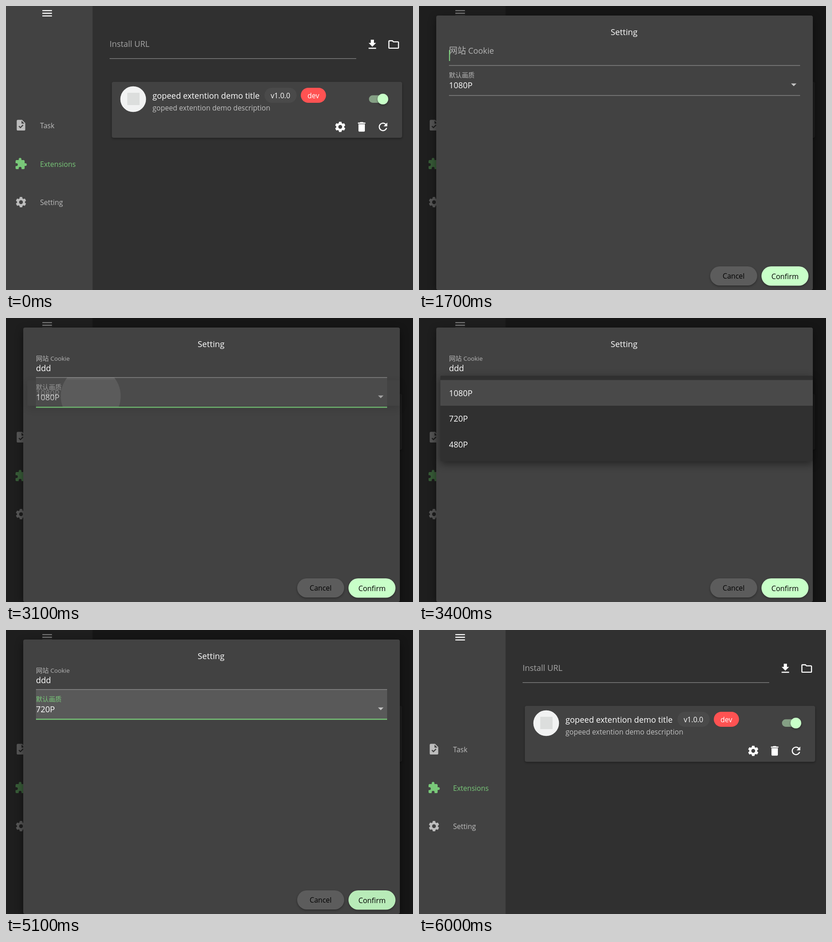
Animation of 896x625 px, one loop 7100 ms. Source, as an HTML page:

```html
<!DOCTYPE html>
<html lang="en">
<head>
<meta charset="utf-8">
<title>Extension settings</title>
<style>
  html, body { margin: 0; height: 100%; overflow: hidden; background: #303030; }
  svg { display: block; width: 100vw; height: 100vh; }
  text { font: 17.9px "Open Sans", "Noto Sans CJK SC", "Noto Sans CJK", sans-serif; fill: #fff; }
  .small { font-size: 15.6px; }
  .medium { font-size: 15.6px; font-weight: 500; }
  .cjk { font-size: 18.8px; }
  .muted { fill: #b5b5b5; }
  .line { fill: #868686; }
  .green { fill: #79c879; }
  .icon { fill: #fff; }
  .icon.muted { fill: #bdbdbd; }
  .icon.green { fill: #79c879; }
  .raised { filter: drop-shadow(0 2px 2px rgba(0, 0, 0, .35)); }
  .dialog { filter: drop-shadow(0 6px 9px rgba(0, 0, 0, .45)); }
</style>
</head>
<body>
<svg viewBox="0 0 896 625">
  <defs>
    <clipPath id="cardClip"><rect x="233" y="167" width="639" height="123" rx="4"/></clipPath>
    <clipPath id="fieldClip"><rect x="66" y="131" width="773" height="66"/></clipPath>
    <clipPath id="rowClip"><rect x="47" y="193" width="820" height="56"/></clipPath>
    <clipPath id="menuClip"><rect class="menuBox" x="47" width="820" rx="2"/></clipPath>
  </defs>

  <rect width="896" height="625" fill="#303030"/>
  <rect width="190.5" height="625" fill="#424242"/>
  <g id="icons"></g>
  <text class="medium" x="75" y="269" style="fill:#bdbdbd">Task</text>
  <text class="medium green" x="75" y="353.5">Extensions</text>
  <text class="medium" x="75" y="438" style="fill:#bdbdbd">Setting</text>

  <text x="228" y="90" style="fill:#a5a5a5">Install URL</text>
  <rect class="line" x="228" y="115" width="543" height="1.3"/>

  <rect class="raised" x="233" y="167" width="639" height="123" rx="4" fill="#424242"/>
  <circle cx="280" cy="205" r="28.3" fill="#f1f2f2"/>
  <rect x="267" y="191" width="27" height="27" fill="#dcdedd"/>
  <text x="322.5" y="204">gopeed extention demo title</text>
  <text class="small" x="322.5" y="230" style="fill:#c0c0c0">gopeed extention demo description</text>
  <rect x="569" y="180" width="71" height="33" rx="16.5" fill="#4a4a4a"/>
  <text class="medium" x="604.2" y="203" text-anchor="middle">v1.0.0</text>
  <rect x="649" y="180" width="55.5" height="33" rx="16.5" fill="#ff5252"/>
  <text class="medium" x="676.7" y="203" text-anchor="middle">dev</text>
  <rect x="799" y="196.5" width="39" height="16.5" rx="8.2" fill="#85a085"/>
  <circle class="raised" cx="829.7" cy="204.8" r="11.8" fill="#c8ffc8"/>
  <g clip-path="url(#cardClip)">
    <circle id="gearRipple" cx="735.5" cy="265.5" fill="#fff" opacity=".2"/>
  </g>
  <g id="cardIcons"></g>

  <rect id="barrier" width="896" height="625"/>
  <g id="dialog">
    <rect class="dialog" x="38" y="21" width="829" height="604" rx="4" fill="#424242"/>
    <text x="451.5" y="64" text-anchor="middle" style="font-size:18.2px">Setting</text>

    <rect id="cookieLine" x="66" width="773"/>
    <text id="cookieLabel"><tspan class="cjk">网站</tspan> Cookie</text>
    <text id="typed" x="66" y="116.5"></text>
    <rect id="caret" class="green" y="97" width="2.3" height="24"/>

    <g clip-path="url(#fieldClip)">
      <rect id="fieldFill" x="66" y="131" width="773" height="66" fill="#fff"/>
      <circle id="fieldRipple" cx="186.5" cy="172" r="66" fill="#fff" opacity=".12"/>
    </g>
    <text id="qualityLabel" x="66" y="157" style="font-size:14.1px">默认画质</text>
    <text id="quality" x="66" y="180.5"></text>
    <path d="M819 170.5h12l-6 6z" fill="#c4c4c4"/>
    <rect id="qualityLine" x="66" width="773"/>

    <rect class="raised" x="641" y="573" width="103.5" height="42" rx="21" fill="#5c5c5c"/>
    <text class="medium" x="692.7" y="600.3" text-anchor="middle" style="fill:#000">Cancel</text>
    <rect id="confirm" class="raised" y="573" height="42.5" rx="21.2"/>
    <text id="confirmText" class="medium" x="805.7" y="601.3" text-anchor="middle" style="fill:#000;font-size:15.9px">Confirm</text>
    <circle id="spinner" cx="805.7" cy="595" r="14.2" pathLength="360" fill="none" stroke="#fff" stroke-width="2.4"/>

    <g id="menu">
      <rect class="menuBox dialog" x="47" width="820" rx="2" fill="#303030"/>
      <g clip-path="url(#menuClip)">
        <rect x="47" y="136.5" width="820" height="56.5" fill="#fff" opacity=".12"/>
        <g id="rowPress" clip-path="url(#rowClip)">
          <rect x="47" y="193" width="820" height="56" fill="#fff" opacity=".09"/>
          <circle id="rowRipple" cx="174.5" cy="221" fill="#fff" opacity=".12"/>
        </g>
        <text x="66" y="171.5">1080P</text>
        <text id="item1" x="66" y="228">720P</text>
        <text id="item2" x="66" y="284.5">480P</text>
      </g>
    </g>
  </g>
</svg>

<script>
const LOOP = 7100, STEP = 100, GREEN = '#79c879', GRAY = '#b5b5b5';
const $ = id => document.getElementById(id);
const clamp = v => Math.max(0, Math.min(1, v));
const span = (t, from, to) => clamp((t - from) / (to - from));
const lerp = (a, b, p) => a + (b - a) * p;
const set = (el, attrs) => { for (const k in attrs) el.setAttribute(k, attrs[k]); };

// Six-toothed cog on a 24-unit grid
function gearPath() {
  const points = [];
  for (let tooth = 0; tooth < 6; tooth++)
    for (const [offset, r] of [[-23, 7.4], [-13, 9.9], [13, 9.9], [23, 7.4]]) {
      const a = (tooth * 60 + 90 + offset) * Math.PI / 180;
      points.push(`${12 + r * Math.cos(a)} ${12 + r * Math.sin(a)}`);
    }
  return `M${points.join('L')}zM8.4 12a3.6 3.6 0 0 1 7.2 0 3.6 3.6 0 0 1-7.2 0z`;
}

const paths = {
  menu: 'M3 18h18v-2H3zM3 13h18v-2H3zM3 6v2h18V6z',
  task: 'M14 2H6c-1.1 0-2 .9-2 2v16c0 1.1.9 2 2 2h12c1.1 0 2-.9 2-2V8zm-3.06 16L7.4 14.46l1.41-1.41 2.12 2.12 4.24-4.24 1.41 1.41zM13 9V3.5L18.5 9z',
  puzzle: 'M20.5 11H19V7c0-1.1-.9-2-2-2h-4V3.5a2.5 2.5 0 0 0-5 0V5H4c-1.1 0-2 .9-2 2v3.8h1.5a2.7 2.7 0 0 1 0 5.4H2V20c0 1.1.9 2 2 2h3.8v-1.5a2.7 2.7 0 0 1 5.4 0V22H17c1.1 0 2-.9 2-2v-4h1.5a2.5 2.5 0 0 0 0-5z',
  gear: gearPath(),
  download: 'M19 9h-4V3H9v6H5l7 7zM5 18v2h14v-2z',
  folder: 'M9.17 6l2 2H20v10H4V6zM10 4H4c-1.1 0-2 .9-2 2v12c0 1.1.9 2 2 2h16c1.1 0 2-.9 2-2V8c0-1.1-.9-2-2-2h-8z',
  trash: 'M6 19c0 1.1.9 2 2 2h8c1.1 0 2-.9 2-2V7H6zM19 4h-3.5l-1-1h-5l-1 1H5v2h14z',
  refresh: 'M17.65 6.35A8 8 0 1 0 19.73 14h-2.08A6 6 0 1 1 16.22 7.78L13 11h7V4z',
};
const icon = (name, x, y, tone = '') =>
  `<path class="icon ${tone}" fill-rule="evenodd" d="${paths[name]}" transform="translate(${x} ${y}) scale(1.175) translate(-12 -12)"/>`;

$('icons').innerHTML = icon('menu', 90.6, 16) + icon('task', 33, 262.3, 'muted') +
  icon('puzzle', 32.8, 347.3, 'green') + icon('gear', 33, 431.7, 'muted') +
  icon('download', 806.5, 84.8) + icon('folder', 853.5, 84.7);
$('cardIcons').innerHTML = icon('gear', 735.8, 266) + icon('trash', 783, 266) + icon('refresh', 830, 266);

function underline(el, bottom, focused) {
  const h = focused ? 2.4 : 1.4;
  set(el, { y: bottom - h, height: h, fill: focused ? GREEN : '#868686' });
}

function drawCookieField(t) {
  const lift = span(t, 1700, 1900), focused = lift >= .5 && t < 3100;
  set($('cookieLabel'), { transform: `translate(66 ${lerp(105, 94, lift)}) scale(${lerp(1, .75, lift)})` });
  $('cookieLabel').style.fill = focused ? GREEN : GRAY;
  underline($('cookieLine'), 131.6, focused);
  const count = [2400, 2500, 2700].filter(at => t >= at).length;
  $('typed').textContent = 'd'.repeat(count);
  const blinkOn = (t >= 1700 && t < 2200) || (t >= 2400 && t < 3100);
  set($('caret'), { x: 66 + count * 11, opacity: +blinkOn });
}

function drawQualityField(t) {
  const focus = span(t, 4100, 4300);
  const opening = t >= 3100 && t < 3200;
  $('quality').textContent = t < 4100 ? '1080P' : '720P';
  $('qualityLabel').style.fill = focus >= .5 ? GREEN : GRAY;
  set($('fieldFill'), { opacity: opening ? .06 : .12 * focus });
  set($('fieldRipple'), { visibility: opening ? 'visible' : 'hidden' });
  underline($('qualityLine'), 197.6, opening || focus >= .5);
}

function drawMenu(t) {
  const a = t < 4100 ? span(t, 3080, 3380) : 1 - span(t, 4070, 4370);
  const fade = t < 4100 ? span(a, 0, .25) : span(a, .75, 1);
  const grow = t < 4100 ? span(a, .25, .5) : 1;
  const top = lerp(136.5, 127, grow), bottom = lerp(193, 315, grow);
  document.querySelectorAll('.menuBox').forEach(el => set(el, { y: top, height: bottom - top }));
  set($('menu'), { opacity: fade });
  set($('item1'), { opacity: span(a, .722, .889) });
  set($('item2'), { opacity: span(a, .833, 1) });
  set($('rowPress'), { opacity: +(t >= 4000) });
  set($('rowRipple'), { r: lerp(35, 97, span(t, 4000, 4100)) });
}

function drawConfirm(t) {
  const p = span(t, 5300, 5700), shrink = p * p * (3 - 2 * p);
  const width = lerp(103.5, 50, shrink), busy = span(t, 5200, 5400);
  set($('confirm'), { x: 805.7 - width / 2, width, fill: t < 5100 ? '#c8ffc8' : '#b8ebb8' });
  set($('confirmText'), { opacity: 1 - busy });
  const sweep = lerp(25, 245, span(t, 5300, 5800));
  set($('spinner'), {
    opacity: busy,
    'stroke-dasharray': `${sweep} 360`,
    transform: `rotate(${40 - (5800 - t) * .25} 805.7 595)`,
  });
}

function draw(t) {
  const shown = Math.min(span(t, 800, 1000), 1 - span(t, 5800, 6000)) ** 1.3;
  set($('barrier'), { opacity: .54 * shown });
  set($('dialog'), { opacity: shown });
  set($('gearRipple'), { r: t >= 800 && t < 1000 ? lerp(15, 41, span(t, 800, 900)) : 0 });
  drawCookieField(t);
  drawQualityField(t);
  drawMenu(t);
  drawConfirm(t);
}

// The screen updates ten times a second
function tick() {
  draw(Math.floor(performance.now() % LOOP / STEP) * STEP);
  requestAnimationFrame(tick);
}
tick();
</script>
</body>
</html>
```
